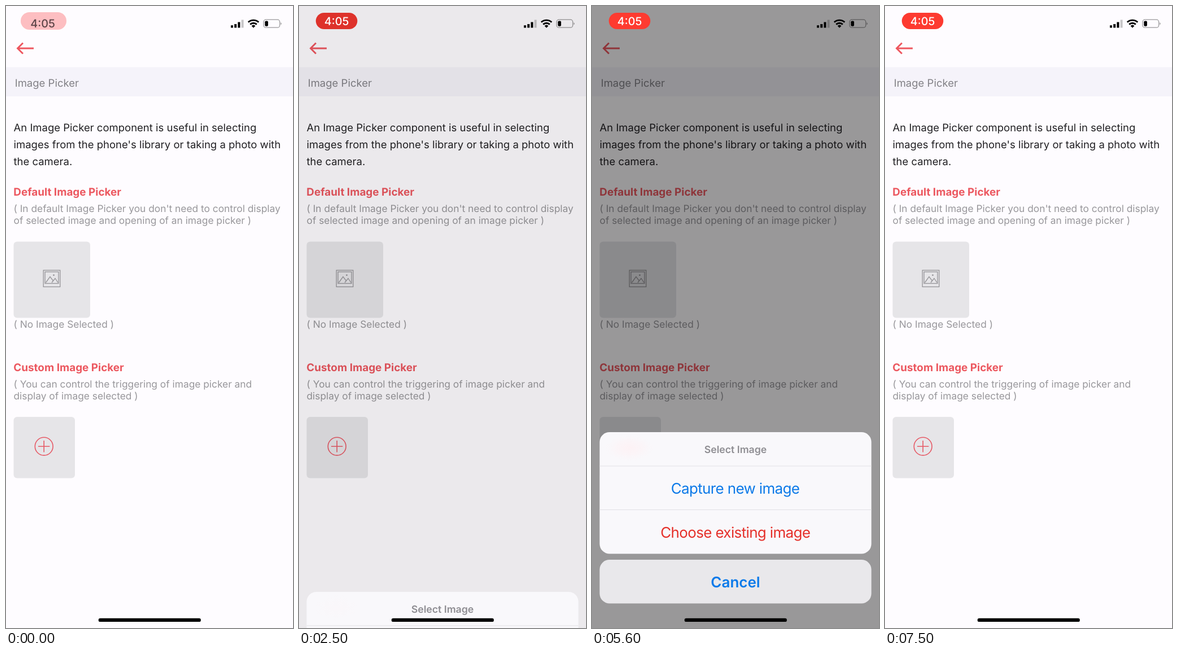
An HTML page that plays this animation: 508x1102 px, repeating every 7600 ms.

```html
<!DOCTYPE html>
<html lang="en">
<head>
<meta charset="utf-8">
<title>Image Picker</title>
<style>
  html, body { margin: 0; width: 100%; height: 100%; overflow: hidden; background: #fefcff; }
  svg { display: block; width: 100vw; height: 100vh; }
  text {
    font: 400 18.5px Inter, "Liberation Sans", sans-serif;
    font-optical-sizing: none;
    text-rendering: geometricPrecision;
  }
  .body { fill: #212023; }
  .title { fill: #828186; }
  .heading { font-size: 18.9px; font-weight: 700; fill: #ec5860; }
  .note { font-size: 17.33px; fill: #98979b; }
  .tile { fill: #e6e5e8; }
  .line { fill: none; stroke-linejoin: miter; }
  .middle { text-anchor: middle; }
  .prompt { font-size: 17.7px; font-weight: 600; fill: #8f8e93; }
  .action { font-size: 26px; letter-spacing: -.65px; }
  .cancel { font-size: 26px; font-weight: 600; fill: #0a7aea; }
  #clock { font-size: 19.8px; font-weight: 500; }
</style>
</head>
<body>
<svg viewBox="0 0 508 1102" preserveAspectRatio="none">
  <defs>
    <radialGradient id="blur">
      <stop offset="0" stop-color="#fdf2f5"/>
      <stop offset=".5" stop-color="#fbf5f8"/>
      <stop offset="1" stop-color="#f9f8fb" stop-opacity="0"/>
    </radialGradient>
  </defs>

  <rect width="508" height="1102" fill="#fefcff"/>
  <path class="line" stroke="#ee565f" stroke-width="2.9" d="M49 75H21M30 65.5L20.5 75L30 84.5"/>
  <rect y="108.5" width="508" height="51.5" fill="#f5f3fa"/>
  <text class="title" x="15.7" y="142.7">Image Picker</text>

  <text class="body" x="13.5" y="222.4">An Image Picker component is useful in selecting</text>
  <text class="body" x="13.5" y="252.2">images from the phone's library or taking a photo with</text>
  <text class="body" x="13.5" y="282">the camera.</text>

  <text class="heading" x="13.3" y="335.7">Default Image Picker</text>
  <text class="note" x="13.5" y="365">( In default Image Picker you don't need to control display</text>
  <text class="note" x="13.5" y="386">of selected image and opening of an image picker )</text>
  <rect class="tile" x="13.5" y="417.5" width="135.5" height="135" rx="6"/>
  <g class="line" stroke="#949397" stroke-width="1.3">
    <rect x="66.2" y="468.2" width="29.6" height="29.3"/>
    <rect x="69" y="471" width="24" height="20.5"/>
    <path d="M70.5 490L78 479.5L83.5 487L87 482.5L92 490M81 490L83.5 487"/>
  </g>
  <circle cx="84.5" cy="476.8" r="1.4" fill="#949397"/>
  <text class="note" x="13.5" y="570.3">( No Image Selected )</text>

  <text class="heading" x="13.3" y="646.5">Custom Image Picker</text>
  <text class="note" x="13.5" y="676">( You can control the triggering of image picker and</text>
  <text class="note" x="13.5" y="697">display of image selected )</text>
  <rect class="tile" x="13.5" y="728" width="108.5" height="108.5" rx="6"/>
  <g class="line" stroke="#e65a66" stroke-width="1.6">
    <circle cx="67.2" cy="780.2" r="15.9"/>
    <path d="M57 780.2H77.4M67.2 770V790.4"/>
  </g>

  <rect id="dim" width="508" height="1102" opacity="0"/>

  <g id="status">
    <path d="M398 34.2h4v4.3h-4zM404.2 32h4v6.5h-4zM410.4 28.5h4v10h-4z"/>
    <rect x="416.6" y="24.5" width="4" height="14" opacity=".22"/>
    <g class="line" stroke="#000" stroke-width="2.9">
      <path d="M428.8 28.7A13.5 13.5 0 0 1 447.2 28.7"/>
      <path d="M432.2 32.6A8.5 8.5 0 0 1 443.8 32.6"/>
    </g>
    <path d="M438 38.7L434.6 35.2A5 5 0 0 1 441.4 35.2Z"/>
    <rect x="456" y="24.2" width="28.6" height="14" rx="4" fill="none" stroke="#000" stroke-opacity=".4" stroke-width="1.3"/>
    <rect x="458.3" y="26.5" width="5.6" height="9.4" rx="1.8"/>
    <path d="M486.2 28.9a2.6 2.6 0 0 1 0 4.6z" opacity=".42"/>
  </g>
  <rect id="pill"/>
  <text id="clock" class="middle">4:05</text>

  <g id="sheet">
    <rect x="13.5" y="755" width="481" height="215.5" rx="17.6" fill="#f9f8fb"/>
    <ellipse id="glow" cx="66" cy="783" rx="48" ry="26" fill="url(#blur)"/>
    <path class="line" d="M13.5 815H494.5M13.5 892.5H494.5" stroke="#e2e1e5"/>
    <text class="prompt middle" x="254" y="792">Select Image</text>
    <text class="action middle" x="253.5" y="864" fill="#0d7ae8">Capture new image</text>
    <text class="action middle" x="253.8" y="942" fill="#e5302a">Choose existing image</text>
    <rect id="cancel" x="13.5" y="981" width="481" height="77.5" rx="17.6"/>
    <text class="cancel middle" x="254" y="1029.8">Cancel</text>
  </g>
  <rect x="163.7" y="1084.7" width="181.2" height="6.4" rx="3.2"/>
</svg>

<script>
const LOOP = 7600, STEP = 100;
const OPEN = 2454, PRESS = 5500, CLOSE = 5610;
const TRAVEL = 347;

const el = id => document.getElementById(id);
const dim = el('dim'), pill = el('pill'), clock = el('clock');
const sheet = el('sheet'), glow = el('glow'), cancel = el('cancel');

const clamp = v => Math.max(0, Math.min(1, v));
const mix = (a, b, k) => a + (b - a) * k;
const mixColor = (a, b, k) => `rgb(${a.map((v, i) => Math.round(mix(v, b[i], k)))})`;
const set = (node, attrs) => {
  for (const name in attrs) node.setAttribute(name, attrs[name]);
};

// Critically damped spring from 0 to 1.
function spring(ms) {
  const x = 17 * Math.max(0, ms) / 1000;
  return 1 - (1 + x) * Math.exp(-x);
}

function drawPill(t) {
  const k = clamp(t / 200);
  const grow = 1 - k;
  const pulse = (1 + Math.cos(2 * Math.PI * (t - 3750) / 1950)) / 2;
  const red = [mix(214, 255, pulse), mix(48, 59, pulse), mix(42, 48, pulse)];
  set(pill, {
    x: 29.8 - 3.8 * grow,
    y: 12 - grow,
    width: 73.5 + 7.5 * grow,
    height: 29 + 2 * grow,
    rx: 14.5 + grow,
    fill: mixColor([253, 190, 193], red, k)
  });
  set(clock, {
    x: mix(65, 66.5, k),
    y: mix(38, 33.8, k),
    fill: mixColor([92, 68, 71], [255, 255, 255], k)
  });
}

function drawSheet(t) {
  const shown = spring(t - OPEN) - spring(t - CLOSE);
  set(dim, { opacity: 0.4 * shown });
  set(glow, { opacity: shown });
  set(sheet, {
    transform: `translate(0 ${TRAVEL * (1 - shown)})`,
    visibility: shown > 0.001 ? 'visible' : 'hidden'
  });
  set(cancel, { fill: t >= PRESS ? '#e9e8eb' : '#fff' });
}

function frame(now) {
  const t = Math.floor((now % LOOP) / STEP) * STEP;
  drawPill(t);
  drawSheet(t);
  requestAnimationFrame(frame);
}

frame(performance.now());
</script>
</body>
</html>
```
